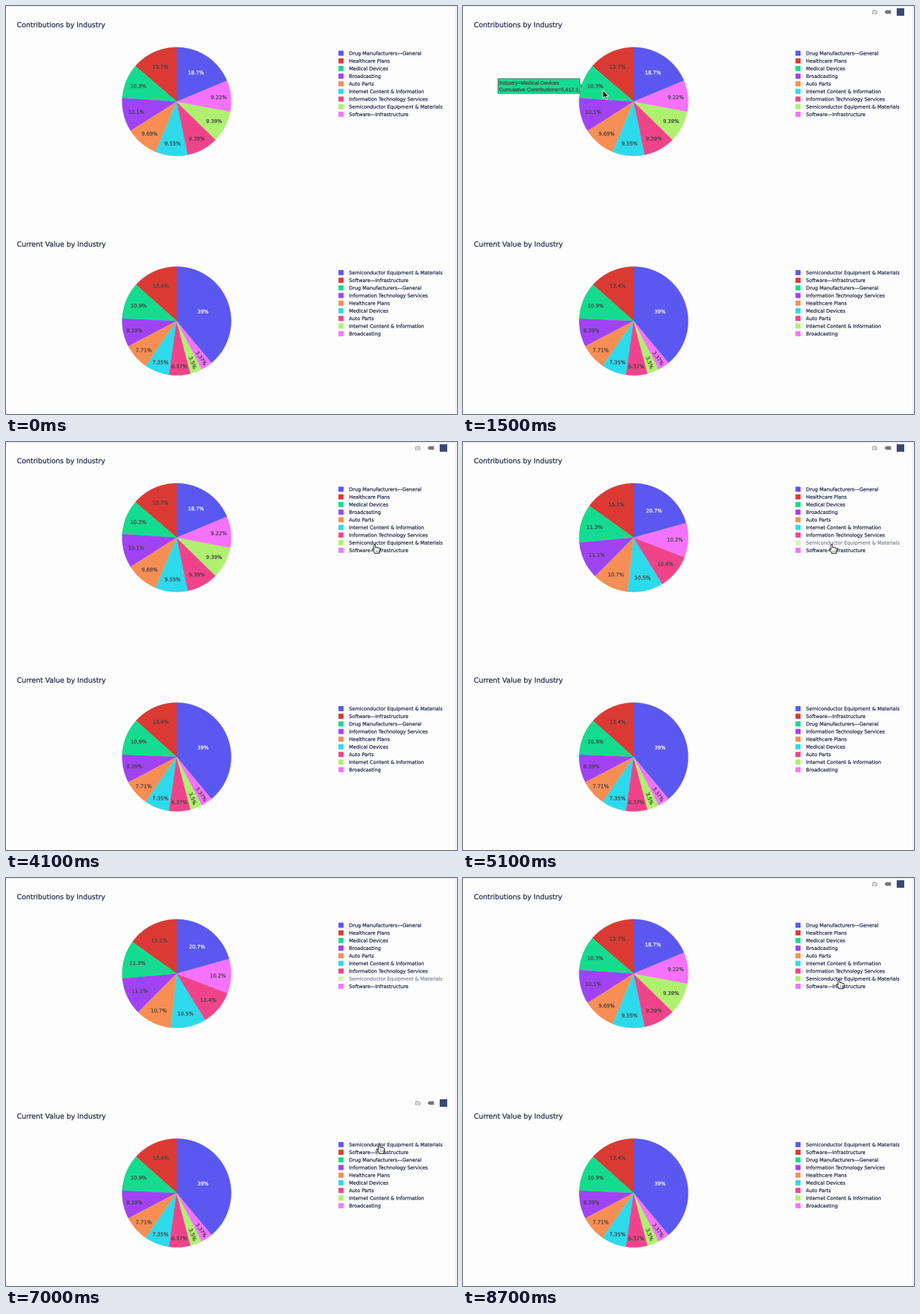
A matplotlib script that plays this animation: 600x544 px, repeating every 8800 ms.

```python
import math
import numpy as np
import matplotlib.pyplot as plt
from matplotlib.animation import FuncAnimation
from matplotlib.patches import (Circle, FancyBboxPatch, PathPatch, Polygon,
                                Rectangle, Wedge)
from matplotlib.textpath import TextPath
from matplotlib.transforms import Affine2D

W, H, DPI = 600, 544, 64
PT = 72 / DPI
STEP, FRAMES = 100, 88

COLORS = ["#5a58f0", "#db3a34", "#14dc8e", "#a043f5", "#f78e53",
          "#2ddaeb", "#f0448a", "#b0f070", "#f573fc"]
INK, DARK = "#1f2847", "#404040"
CX, R = 227, 72.5
TOP_Y, LOW_Y = 127.5, 420
ROW = 10.18

CONTRIB = [
    ("Drug Manufacturers—General", 9864.8), ("Healthcare Plans", 7209.7),
    ("Medical Devices", 5412.3), ("Broadcasting", 5306.1),
    ("Auto Parts", 5106.4), ("Internet Content & Information", 5032.6),
    ("Information Technology Services", 4948.2),
    ("Semiconductor Equipment & Materials", 4946.9),
    ("Software—Infrastructure", 4858.7)]
CURRENT = [
    ("Semiconductor Equipment & Materials", 39.0),
    ("Software—Infrastructure", 13.4), ("Drug Manufacturers—General", 10.9),
    ("Information Technology Services", 8.39), ("Healthcare Plans", 7.71),
    ("Medical Devices", 7.35), ("Auto Parts", 6.37),
    ("Internet Content & Information", 3.5), ("Broadcasting", 3.37)]
HIDDEN = 7

# time in ms, pointer x, pointer y
PATH = np.array([
    (100, 120, 62), (600, 180, 105), (1000, 224, 102.5), (1500, 186, 112),
    (1900, 190, 110), (2300, 240, 98), (2500, 241.7, 97), (2800, 243, 97),
    (3600, 480, 130), (4000, 490.5, 136.7), (5500, 490.5, 136.7),
    (6400, 496, 325), (6700, 496.5, 355.3), (7600, 496.5, 355.3),
    (8300, 500, 135.7), (8800, 500, 135.7)])
CLICK_OFF, CLICK_ON = 4600, 8500

ARROW = 1.15 * np.array([(0, 0), (0, 9.6), (2.2, 7.6), (3.7, 11), (5.2, 10.4),
                         (3.8, 7.1), (6.8, 7.1)])
HAND = np.array([
    (-1, .3), (0, -.4), (1, .3), (1.2, 4), (2.6, 3.6), (3.4, 4.2), (4.6, 4),
    (5.3, 4.8), (6.3, 4.7), (7, 5.6), (7, 8.6), (6, 10.5), (6, 12), (.2, 12),
    (-.5, 10.2), (-3, 7.4), (-3.4, 6.2), (-2.4, 5.8), (-1, 7)])

fig = plt.figure(figsize=(W / DPI, H / DPI), dpi=DPI, facecolor="#fefdfe")
ax = fig.add_axes([0, 0, 1, 1])
ax.set_xlim(0, W)
ax.set_ylim(H, 0)
ax.axis("off")


def put(patch):
    return ax.add_patch(patch)


def outline(s, px, family):
    return TextPath((0, 0), s, size=px, prop={"family": family})


def write(x, y, s, px, color=INK, center=False, angle=0,
          family="DejaVu Sans", **kw):
    """Text outlines whose capitals are centred on y; angle is clockwise."""
    path = outline(s, px, family)
    box = path.get_extents()
    mid = (box.x0 + box.x1) / 2 if center else 0
    place = (Affine2D().translate(-mid, -.365 * px).scale(1, -1)
             .rotate_deg(angle).translate(x, y))
    return put(PathPatch(path.transformed(place), fc=color, ec=color,
                         lw=.2 * PT, snap=False, **kw))


def slices(rows, hidden=None):
    """Yield index, share and clockwise angles from the top of each slice."""
    total = sum(v for i, (_, v) in enumerate(rows) if i != hidden)
    end = 360
    for i, (_, v) in enumerate(rows):
        if i == hidden:
            continue
        share = v / total
        span = 360 * share
        if i == 0:
            yield i, share, 0, span
        else:
            yield i, share, end - span, end
            end -= span


def anchor(cy, a0, a1):
    """Centre and radius of the circle inscribed in a slice."""
    s = math.sin(math.radians((a1 - a0) / 2))
    r = min(s / (1 + s), .5) * R
    mid = math.radians((a0 + a1) / 2)
    return CX + (R - r) * math.sin(mid), cy - (R - r) * math.cos(mid), r


def draw_chart(title, rows, cy, hidden=None):
    top = cy - TOP_Y
    arts = [write(14.5, top + 24.9, title, 9.25)]
    for i, share, a0, a1 in slices(rows, hidden):
        c = COLORS[i]
        arts.append(put(Wedge((CX, cy), R, a0 - 90, a1 - 90,
                              fc=c, ec=c, lw=.3)))
    for i, share, a0, a1 in slices(rows, hidden):
        x, y, r = anchor(cy, a0, a1)
        angle = 0
        if share < .05:
            angle = (a0 + a1) / 2 - 90
            x = CX + 59.5 * math.cos(math.radians(angle))
            y = cy + 59.5 * math.sin(math.radians(angle))
        arts.append(write(x, y, f"{100 * share:.3g}%", 6.75,
                          "white" if i == 0 else DARK, True, angle))
    for i, (name, _) in enumerate(rows):
        y = top + 63 + ROW * i
        alpha = .5 if i == hidden else 1
        arts.append(put(Rectangle((442.3, y - 3.4), 6.8, 6.8, fc=COLORS[i],
                                  ec="none", alpha=alpha, snap=False)))
        arts.append(write(456.3, y, name, 6.46, alpha=alpha))
    return arts


def draw_tools(y):
    gray, mid = "#b8b8bd", "#74747a"
    body = FancyBboxPatch((544.3, y - 1.9), 6.8, 4.9, fc=gray, ec=gray, lw=.3,
                          boxstyle="round,pad=0,rounding_size=1")
    tag = [(560.8, y), (563, y - 2.4), (569.4, y - 2.4), (569.4, y + 2.4),
           (563, y + 2.4)]
    return [put(body),
            put(Rectangle((546, y - 3.2), 3.4, 1.6, fc=gray, ec="none")),
            put(Circle((547.7, y + .5), 1.9, fc="white", ec="none")),
            put(Circle((547.7, y + .5), 1.1, fc=gray, ec="none")),
            put(Polygon(tag, fc=mid, ec="none")),
            put(Rectangle((577.3, y - 4.7), 9.4, 9.4, fc="#3b4a73",
                          ec="none"))]


def show(arts, on):
    for a in arts:
        a.set_visible(on)


put(Rectangle((0, 0), W, 1, fc="#e6e6ea", ec="none"))
put(Rectangle((598, 0), 1, H, fc="#e8e8ec", ec="none"))
full = draw_chart("Contributions by Industry", CONTRIB, TOP_Y)
reduced = draw_chart("Contributions by Industry", CONTRIB, TOP_Y, HIDDEN)
draw_chart("Current Value by Industry", CURRENT, LOW_Y)
tools_top, tools_low = draw_tools(8), draw_tools(300)
live = []


def pointer(t):
    k = min(np.searchsorted(PATH[:, 0], t, side="right"), len(PATH) - 1)
    a, b = PATH[k - 1], PATH[k]
    u = (t - a[0]) / (b[0] - a[0])
    u = u * u * (3 - 2 * u)
    return a[1:] + (b[1:] - a[1:]) * u


def in_legend(x, y):
    return 440 < x < 584 and (58 < y < 150 or 350 < y < 442)


def draw_tip(i, a0, a1):
    name, value = CONTRIB[i]
    lines = f"Industry={name}", f"Cumulative Contributions={value:,.1f}"
    font = "Liberation Sans"
    x, y, r = anchor(TOP_Y, a0, a1)
    side = 1 if (a0 + a1) / 2 < 180 else -1
    tip = x + side * r
    near = tip + side * 3.2
    w = max(outline(s, 7, font).get_extents().width for s in lines) + 4
    far = near + side * w
    ink = "white" if i == 0 else DARK
    shape = [(tip, y), (near, y - 3.2), (near, y - 9.8), (far, y - 9.8),
             (far, y + 9.8), (near, y + 9.8), (near, y + 3.2)]
    live.append(put(Polygon(shape, fc=COLORS[i], ec=ink, lw=.6 * PT,
                            snap=False, zorder=5)))
    for k, s in enumerate(lines):
        live.append(write(min(near, far) + 1.5, y - 4.3 + 8.9 * k, s, 7, ink,
                          family=font, zorder=6))


def draw_pointer(x, y):
    if in_legend(x, y):
        style = dict(fc="white", ec="#222222", lw=.9 * PT)
        shape = HAND
    else:
        style = dict(fc="#111111", ec="white", lw=.8 * PT)
        shape = ARROW
    live.append(put(Polygon(shape + (x, y), zorder=8, joinstyle="round",
                            **style)))
    if shape is HAND:
        for dx in (1.8, 3.6, 5.3):
            live.extend(ax.plot([x + dx, x + dx], [y + 7, y + 9.8],
                                color="#222222", lw=.5 * PT, zorder=9))


def update(n):
    t = n * STEP
    while live:
        live.pop().remove()
    off = CLICK_OFF <= t < CLICK_ON
    show(full, not off)
    show(reduced, off)
    inside = t >= PATH[0, 0]
    x, y = pointer(t) if inside else (0, 0)
    show(tools_top, inside and y < 292)
    show(tools_low, inside and y >= 292)
    if not inside:
        return
    if math.hypot(x - CX, y - TOP_Y) < R:
        angle = math.degrees(math.atan2(x - CX, TOP_Y - y)) % 360
        for i, _, a0, a1 in slices(CONTRIB, HIDDEN if off else None):
            if a0 <= angle < a1:
                draw_tip(i, a0, a1)
    draw_pointer(x, y)


anim = FuncAnimation(fig, update, frames=FRAMES, interval=STEP,
                     init_func=lambda: update(0), repeat=True, repeat_delay=0,
                     blit=False)
plt.show()
```
